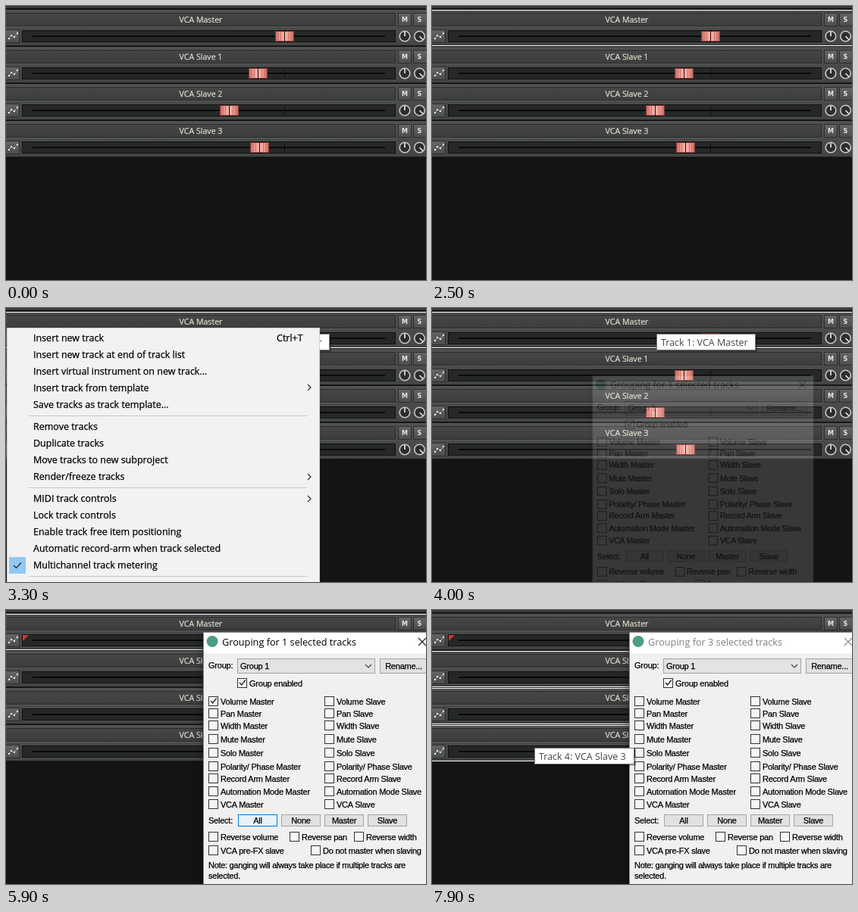
An HTML page for the animation above (8000 ms loop, 554 px wide and 362 px high).

```html
<!DOCTYPE html>
<html lang="en">
<head>
<meta charset="utf-8">
<title>VCA grouping</title>
<style>
html, body { margin: 0; width: 100%; height: 100%; overflow: hidden; background: #141414; }
svg { display: block; width: 554px; height: 362px; }
text { white-space: pre; }
.ui { font: 12.5px "Open Sans", "Noto Sans", sans-serif; }
#menu .ui { stroke: #000; stroke-width: .25px; }
.name { font: 10.6px "Open Sans", "Noto Sans", sans-serif; text-anchor: middle; fill: #e2decf; stroke: #e2decf; stroke-width: .2px; }
.ms { font: bold 8px "DejaVu Sans", sans-serif; text-anchor: middle; fill: #e6e6e2; }
.dlg { font: 11px "Liberation Sans", Arial, sans-serif; letter-spacing: -.23px; stroke: #000; stroke-width: .25px; }
.mid { text-anchor: middle; }
#dialog { filter: drop-shadow(0 3px 6px rgba(0, 0, 0, .45)); }
</style>
</head>
<body>
<svg id="stage" viewBox="0 0 554 362">
<defs>
  <linearGradient id="row" x2="0" y2="1"><stop stop-color="#505252"/><stop offset="1" stop-color="#434545"/></linearGradient>
  <linearGradient id="bar" x2="0" y2="1"><stop stop-color="#454747"/><stop offset="1" stop-color="#3c3e3e"/></linearGradient>
  <linearGradient id="btn" x2="0" y2="1"><stop stop-color="#646666"/><stop offset="1" stop-color="#4c4e4e"/></linearGradient>
  <linearGradient id="knob"><stop stop-color="#c4645b"/><stop offset=".2" stop-color="#ea9389"/><stop offset=".45" stop-color="#f5b0a6"/><stop offset=".55" stop-color="#f5b0a6"/><stop offset=".8" stop-color="#ea9389"/><stop offset="1" stop-color="#c4645b"/></linearGradient>
</defs>
</svg>
<script>
const LOOP = 8000, PITCH = 49;
const stage = document.getElementById("stage");
const $ = id => document.getElementById(id);

const rect = (x, y, w, h, fill, stroke, extra = "") => stroke
  ? `<rect x="${x + .5}" y="${y + .5}" width="${w - 1}" height="${h - 1}" fill="${fill}" stroke="${stroke}" ${extra}/>`
  : `<rect x="${x}" y="${y}" width="${w}" height="${h}" fill="${fill}" ${extra}/>`;
const text = (x, y, s, cls, extra = "") => `<text x="${x}" y="${y}" class="${cls}" ${extra}>${s}</text>`;
const path = (d, color, width = 1.2, extra = "") =>
  `<path d="${d}" fill="none" stroke="${color}" stroke-width="${width}" ${extra}/>`;
const group = (id, body) => `<g id="${id}">${body}</g>`;

// Track panel
const dial = (x, dx, dy) =>
  `<circle cx="${x}" cy="40" r="6.8" fill="#2c2e2e" stroke="#c8c8c4" stroke-width="1.6"/>` +
  path(`M${x} 40l${dx} ${dy}`, "#e4e4e0", 1.7);

const fader = x => rect(x - 12, 33, 25, 14, "url(#knob)", "#8a3c36") +
  [-8, -5, 5, 8].map(d => rect(x + d, 34, 1, 12, "#cf756b")).join("") +
  rect(x, 33, 1, 14, "#2a0c0a");

const envelope = path("M4 43l3-4 4 2 4-5", "#a8a8a4", 1) +
  [[4, 43], [7, 39], [11, 41], [15, 36]].map(([x, y]) => rect(x - 1, y - 1, 2, 2, "#f4f4f0")).join("");

function track(name, x, i) {
  const notch = i ? rect(367, 34, 1, 12, "#0c0c0c") : "";
  return `<g transform="translate(0 ${i * PITCH})">` +
    rect(0, 5, 554, 47, "url(#row)") + rect(0, 52, 554, 2, "#161616") +
    rect(-1, 9, 515, 18, "url(#bar)", "#2a2c2c") + rect(0, 27, 514, 1, "#5a5c5c") +
    text(257, 22, name, "name") +
    rect(517, 9, 18, 18, "url(#btn)", "#2c2e2e") + text(526, 21, "M", "ms") +
    rect(537, 9, 18, 18, "url(#btn)", "#2c2e2e") + text(545.5, 21, "S", "ms") +
    rect(-1, 31, 19, 18, "url(#btn)", "#2c2e2e") + envelope +
    rect(21, 32, 493, 16, "#262828", "#101010") +
    rect(35, 39, 465, 2, "#0a0a0a") + notch +
    dial(526, 0, -6) + dial(545.5, 4.5, 4.5) +
    group("fader" + i, fader(x)) +
    group("sel" + i, rect(0, 5, 554, 1, "#fff") + rect(0, 52, 554, 1, "#fff")) + "</g>";
}

// Context menu: label and vertical centre
const items = [["Insert new track", 40], ["Insert new track at end of track list", 62],
  ["Insert virtual instrument on new track...", 84], ["Insert track from template", 105.5],
  ["Save tracks as track template...", 128], ["Remove tracks", 157], ["Duplicate tracks", 179],
  ["Move tracks to new subproject", 201], ["Render/freeze tracks", 223], ["MIDI track controls", 252],
  ["Lock track controls", 274], ["Enable track free item positioning", 296],
  ["Automatic record-arm when track selected", 318], ["Multichannel track metering", 340]];
const menu = rect(1, 26, 413, 345, "#f2f2f2", "#d0d0d0") +
  items.map(([s, y]) => text(36, y + 4, s, "ui")).join("") +
  text(357, 44, "Ctrl+T", "ui") +
  [142, 237, 354].map(y => rect(30, y, 367, 1, "#c6c6c6")).join("") +
  [105, 223, 252].map(y => path(`M398 ${y - 4}l4 4-4 4`, "#333")).join("") +
  rect(4, 329, 22, 22, "#90c8f6") + path("M10 340l3.5 3.5 6.5-7", "#222");

// Grouping dialog, in its own coordinates
const tick = (x, y, id) => path(`M${x + 3} ${y}l2.7 3 5-6.5`, "#222", 1.3, id ? `id="${id}"` : "");
const check = (x, y, s, id = "") => rect(x, y - 6, 13, 13, "#f5f5f5", "#333", id && `id="${id}"`) +
  text(x + 16, y + 4.5, s, "dlg");
const button = (x, y, w, h, s, id = "") =>
  rect(x, y, w, h, "#e1e1e1", "#a4a4a4", id && `id="${id}"`) + text(x + w / 2, y + h / 2 + 4, s, "dlg mid");
const params = ["Volume", "Pan", "Width", "Mute", "Solo", "Polarity/ Phase", "Record Arm", "Automation Mode", "VCA"];
const paramY = [91, 107, 123, 141, 159, 177, 193, 210, 227];

const dialog = rect(0, 0, 305, 345, "#f0f0f0", "#8a8a8a") + rect(1, 1, 303, 27, "#fff") +
  `<circle cx="12" cy="12.5" r="7.5" fill="#4c9c88"/>` +
  group("caption", text(25, 17.5, "", "ui", 'id="title" style="font-size:12.7px"') +
    path("M284 8l10 10m0-10l-10 10", "#222")) +
  text(7, 48, "Group:", "dlg") + rect(45, 35, 182, 20, "#e3e3e3", "#a4a4a4") +
  text(49, 49, "Group 1", "dlg") + path("M214 43l4 4 4-4", "#444") +
  button(233, 35, 63, 20, "Rename...") + check(45, 67, "Group enabled") + tick(45, 67) +
  params.map((p, i) => check(7, paramY[i], p + " Master", "box" + i) + check(160, paramY[i], p + " Slave")).join("") +
  tick(7, paramY[0], "volTick") + tick(7, paramY[8], "vcaTick") +
  text(7, 253, "Select:", "dlg") + button(46, 241, 52, 16, "All", "all") +
  button(103, 241, 52, 16, "None") + button(160, 241, 52, 16, "Master") + button(217, 241, 52, 16, "Slave") +
  check(7, 270, "Reverse volume") + check(114, 270, "Reverse pan") + check(199, 270, "Reverse width") +
  check(7, 288, "VCA pre-FX slave") + check(142, 288, "Do not master when slaving") +
  text(7, 312, "Note: ganging will always take place if multiple tracks are", "dlg", 'style="letter-spacing:-.3px"') +
  text(7, 326, "selected.", "dlg");

const tip = (id, w, s) => group(id, rect(2, 2, w, 22, "#000", "", 'opacity=".3"') +
  rect(0, 0, w, 22, "#fff", "#767676") + text(6, 15.5, s, "ui", 'fill="#444"'));

const names = ["VCA Master", "VCA Slave 1", "VCA Slave 2", "VCA Slave 3"];
stage.insertAdjacentHTML("beforeend",
  rect(0, 0, 554, 362, "#141414") + rect(0, 0, 554, 3, "#3a3838") +
  names.map((n, i) => track(n, [367, 332, 294, 334][i], i)).join("") +
  `<path id="corner" d="M22 33h8l-8 8z" fill="#d0382a"/>` +
  tip("volTip", 102, "") + tip("tip1", 131, "Track 1: VCA Master") +
  group("menu", menu) + group("dialog", dialog) + tip("tip4", 132, "Track 4: VCA Slave 3"));

const clamp = v => Math.max(0, Math.min(1, v));
const ramp = (t, a, b) => clamp((t - a) / (b - a));
const set = (id, key, v) => $(id).setAttribute(key, v);
const fade = (id, v) => { set(id, "opacity", v); $(id).style.display = v > 0 ? "" : "none"; };
const place = (id, x, y, k = 1) => set(id, "transform", `translate(${x} ${y}) scale(${k})`);

function draw(t) {
  const during = (a, b) => t >= a && t < b;

  // Selection
  fade("sel0", +during(700, 6900));
  fade("sel1", +(t >= 6900));
  fade("sel2", +(t >= 7400));
  fade("sel3", +(t >= 7400));

  // Master fader is dragged right, then reset
  const p = ramp(t, 800, 1500);
  const shift = t < 2100 ? Math.round(73 * p * p * (3 - 2 * p) - 13 * ramp(t, 1500, 2000)) : 0;
  place("fader0", shift, 0);
  place("volTip", t < 2100 ? 372 + shift : 436, t < 2100 ? 70 : 57);
  $("volTip").querySelector("text").textContent = `Volume: ${(shift * .08).toFixed(2)}dB`;
  fade("volTip", t < 900 ? 0 : 1 - ramp(t, 2200, 2500));

  // Menu, then dialog: it zooms in, then is dragged up and right
  place("tip1", 296, 34);
  fade("tip1", t < 2900 ? 0 : 1 - ramp(t, 4000, 4300));
  fade("menu", during(3000, 4000) ? 1 - .15 * (1 - ramp(t, 3000, 3200)) : 0);
  const open = 1 - (1 - ramp(t, 4000, 4300)) ** 2;
  fade("dialog", t < 4000 ? 0 : .16 + .84 * open);
  const k = .958 + .042 * open;
  const rest = (1 - ramp(t, 4800, 5200)) ** 2;
  if (t < 4800) place("dialog", 205 + 152 * (1 - k), 82 + 172 * (1 - k), k);
  else place("dialog", Math.round(260 - 24 * rest), Math.round(29 + 15 * rest));

  // Pointer over the controls
  const hot = during(5400, 5600) ? 0 : during(6300, 6400) ? 5 : during(6400, 6500) ? 7 : -1;
  params.forEach((_, i) => set("box" + i, "stroke", i === hot ? "#0078d7" : "#333"));
  const over = during(5800, 6100);
  set("all", "fill", over ? "#e5f1fb" : "#e1e1e1");
  set("all", "stroke", over ? "#0078d7" : "#a4a4a4");
  fade("volTick", +during(5500, 6900));
  fade("vcaTick", +during(6500, 6900));
  fade("corner", +(t >= 5500));

  // Tracks picked behind the dialog
  $("title").textContent = `Grouping for ${t < 7400 ? 1 : 3} selected tracks`;
  set("caption", "opacity", t < 6900 ? 1 : .5);
  place("tip4", 135, 182);
  fade("tip4", ramp(t, 7500, 7800));
}

function frame(now) {
  draw(Math.floor(now % LOOP / 100) * 100);
  requestAnimationFrame(frame);
}
draw(0);
requestAnimationFrame(frame);
</script>
</body>
</html>
```
